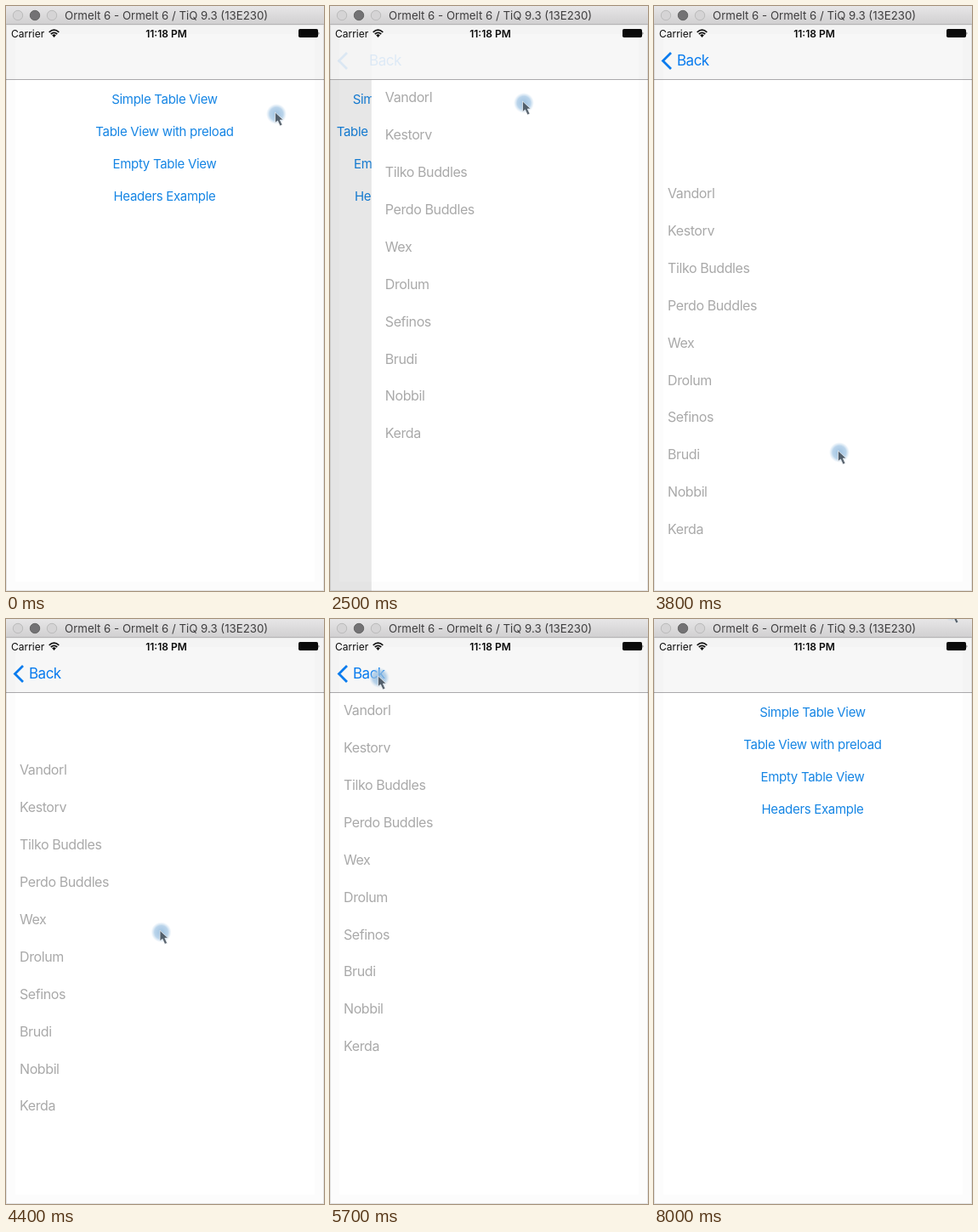
Animation, 374 px wide and 688 px high, one loop 8200 ms. Source, as an HTML page:

```html
<!DOCTYPE html>
<html lang="en">
<head>
<meta charset="utf-8">
<title>Table view demo</title>
<style>
  html, body { margin: 0; width: 100%; height: 100%; overflow: hidden; background: #fff; }
  svg { display: block; font-family: Inter, Roboto, sans-serif; }
  .button { font-size: 15px; letter-spacing: -.02em; fill: #1585e4; text-anchor: middle; }
  .row { font-size: 16px; letter-spacing: -.025em; fill: #a9a9a9; }
  #back { font-size: 17px; letter-spacing: -.03em; fill: #087bee; }
</style>
</head>
<body>
<svg width="374" height="688" viewBox="0 0 374 688">
  <defs>
    <linearGradient id="chrome" x2="0" y2="1">
      <stop stop-color="#e7e6e7"/><stop offset="1" stop-color="#d0cfd0"/>
    </linearGradient>
    <radialGradient id="glow">
      <stop stop-color="#8db6da" stop-opacity=".85"/>
      <stop offset=".65" stop-color="#9dc2e2" stop-opacity=".7"/>
      <stop offset="1" stop-color="#b5d2ea" stop-opacity="0"/>
    </radialGradient>
  </defs>

  <g id="menu"><rect y="22" width="374" height="666" fill="#fff"/></g>
  <rect id="shade" y="22" width="374" height="666"/>
  <g id="table">
    <rect y="22" width="374" height="666" fill="#fff"/>
    <g id="list"><path id="lines" stroke="#c8c7cc"/></g>
  </g>

  <rect y="22" width="374" height="64" fill="#f6f6f6" fill-opacity=".87"/>
  <path d="M0 86.5H374" stroke="#aaa9ab"/>
  <g id="navBack">
    <path d="M20 55L10.5 64.5L20 74" fill="none" stroke="#087bee" stroke-width="2.8"/>
    <text id="back" y="70">Back</text>
  </g>

  <g font-size="12" fill="#0a0a0a">
    <text x="6" y="36.5">Carrier</text>
    <text x="188.5" y="36.5" text-anchor="middle" font-weight="600">11:18 PM</text>
    <path d="M50.7 30.8Q56.5 25.4 62.3 30.8M52.8 33Q56.5 29.6 60.2 33" fill="none" stroke="#111" stroke-width="1.7"/>
    <path d="M54.2 34.3Q56.5 32.4 58.8 34.3L56.5 37Z"/>
    <rect x="344" y="27" width="23" height="10" rx="1.8"/>
    <path d="M367.6 30.2Q369.4 32.2 367.6 34.4Z"/>
  </g>

  <g fill="none" stroke="#000">
    <rect y="22" width="374" height="666" stroke-width="22" stroke-opacity=".01"/>
    <rect x=".5" y="22" width="373" height="665.5" stroke-opacity=".1"/>
  </g>
  <rect width="374" height="22" fill="url(#chrome)"/>
  <path d="M0 21.5H374" stroke="#b4b3b4"/>
  <g fill="#d5d4d5" stroke="#bbb">
    <circle cx="14" cy="11" r="5.7"/>
    <circle cx="34" cy="11" r="5.7" fill="#737274" stroke="#666"/>
    <circle cx="54" cy="11" r="5.7"/>
  </g>
  <text x="69" y="16" font-size="13.25" fill="#3e3d3e">Ormelt 6 - Ormelt 6 / TiQ 9.3 (13E230)</text>

  <g id="cursor">
    <circle r="12" fill="url(#glow)"/>
    <path d="M-1.5 -2V10.5L1.5 8L4.2 14L7 12.8L4.3 7H8.2Z" fill="#48535e" fill-opacity=".9" stroke="#f4f7fa" stroke-opacity=".7"/>
  </g>
</svg>
<script>
const WIDTH = 374, LOOP = 8200, TICK = 100, ROW = 43.93;
const buttons = ['Simple Table View', 'Table View with preload', 'Empty Table View', 'Headers Example'];
const people = ['Vandorl', 'Kestorv', 'Tilko Buddles', 'Perdo Buddles', 'Wex',
  'Drolum', 'Sefinos', 'Brudi', 'Nobbil', 'Kerda'];

// time, x, y
const cursorPath = [
  [0, 318, 127], [400, 325, 122], [800, 325, 122], [1400, 258, 118], [1500, 258, 118],
  [2000, 228, 114], [2500, 228, 114], [3000, 226, 160], [3100, 226, 160], [3800, 218, 525],
  [4000, 218, 526], [4900, 133, 148], [5000, 133, 148], [5700, 58, 69], [6500, 58, 69],
  [6900, 96, 66], [7700, 351, -9], [LOOP, 351, -9]
];
const DRAG_START = 3100, DRAG_END = 5000, GRAB_Y = 160;

const el = id => document.getElementById(id);
const clamp = v => Math.max(0, Math.min(1, v));
const smooth = v => v * v * (3 - 2 * v);
const move = (id, x, y) => el(id).setAttribute('transform', `translate(${x} ${y})`);

function addText(parent, text, className, x, y) {
  const node = document.createElementNS('http://www.w3.org/2000/svg', 'text');
  node.textContent = text;
  node.setAttribute('class', className);
  node.setAttribute('x', x);
  node.setAttribute('y', y);
  el(parent).append(node);
}

buttons.forEach((label, i) => addText('menu', label, 'button', 186.5, 114.5 + 38 * i));
people.forEach((name, i) => addText('list', name, 'row', 16, 113 + ROW * i));
el('lines').setAttribute('d',
  Array.from({ length: 13 }, (_, i) => `M16 ${Math.round(129.2 + ROW * i) + .5}H${WIDTH}`).join(''));

// Critically damped approach from 0 to 1
function spring(ms, rate) {
  const x = Math.max(0, ms) / 1000 * rate;
  return 1 - (1 + x) * Math.exp(-x);
}

function cursorAt(t) {
  const i = cursorPath.findIndex(key => key[0] > t);
  const [t0, x0, y0] = cursorPath[i - 1], [t1, x1, y1] = cursorPath[i];
  const k = smooth((t - t0) / (t1 - t0));
  return [x0 + (x1 - x0) * k, y0 + (y1 - y0) * k];
}

function scrollAt(t, y) {
  if (t < DRAG_START) return 0;
  if (t > DRAG_END) return -12 * (1 - spring(t - DRAG_END, 14));
  const pull = y - GRAB_Y;
  return pull < 0 ? pull : 600 * (1 - 1 / (1 + pull * .381 / 600));
}

function draw(t) {
  const [x, y] = cursorAt(t);
  const shown = t < 6000 ? spring(t - 2180, 11.1) : 1 - spring(t - 6020, 14);
  const scroll = scrollAt(t, y);

  move('cursor', x, y);
  move('menu', -.3 * WIDTH * shown, 0);
  move('table', WIDTH * (1 - shown), 0);
  move('list', 0, scroll);
  el('shade').setAttribute('opacity', .11 * shown);
  el('lines').setAttribute('opacity', t > 4100 && t <= DRAG_END && scroll < 20 ? 1 : 0);
  el('navBack').setAttribute('opacity', t < 6000 ? clamp((t - 2460) / 400) : clamp(1 - (t - 6050) / 300));
  el('back').setAttribute('x', 27 + 146 * (1 - shown));
}

function frame() {
  const t = performance.now() % LOOP;
  draw(Math.floor(t / TICK) * TICK);
  requestAnimationFrame(frame);
}
frame();
</script>
</body>
</html>
```
